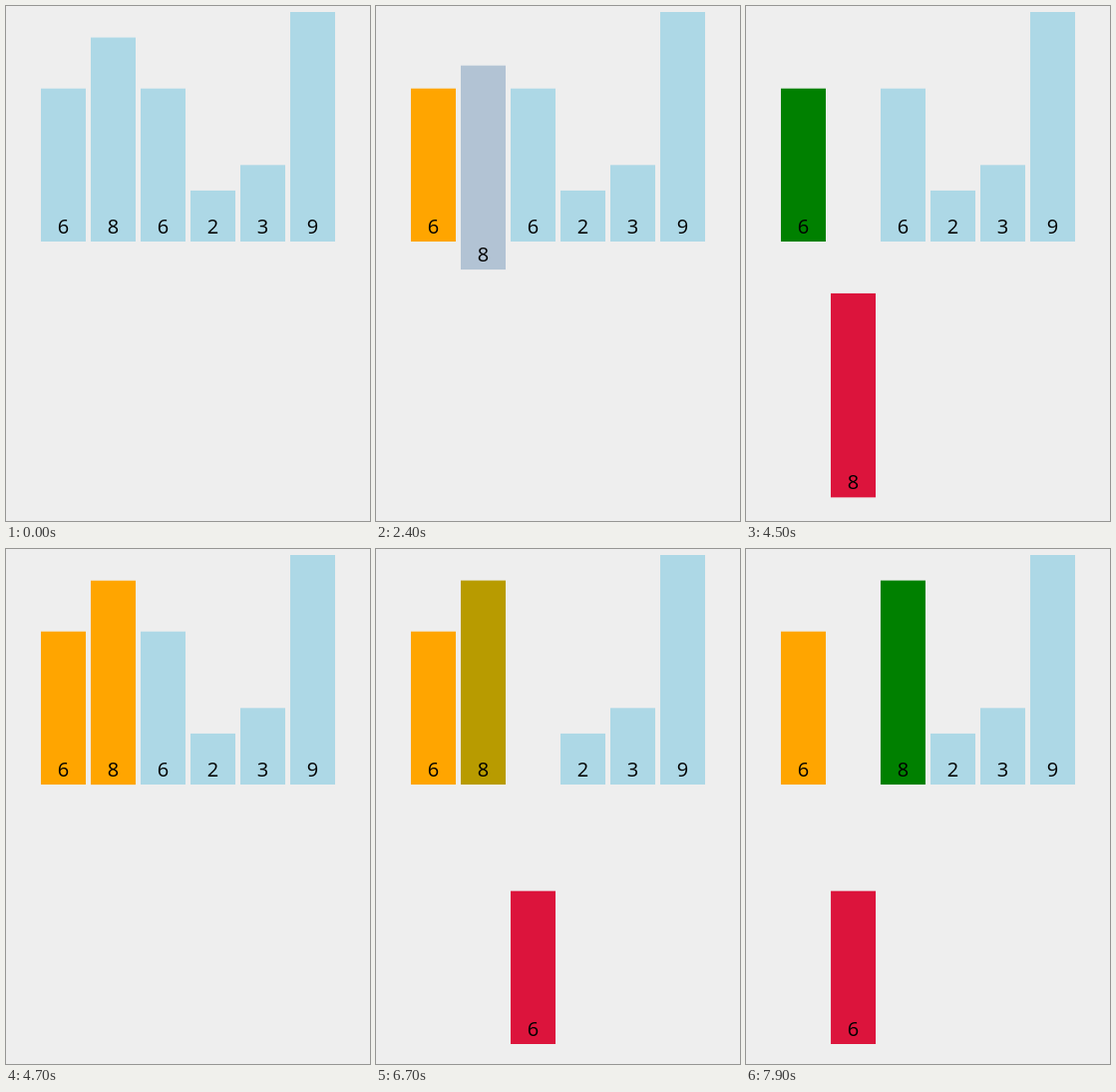
Recreate the animation shown at these times as an HTML page. Size 365 px wide and 516 px high, loop 8 s.

```html
<!DOCTYPE html>
<html lang="en">
<head>
<meta charset="utf-8">
<title>Insertion sort</title>
<style>
html, body { margin: 0; width: 100%; height: 100%; overflow: hidden; background: #eee; }
svg { display: block; width: 365px; height: 516px; }
text { font: 20px "Open Sans", "Noto Sans", sans-serif; text-anchor: middle; }
</style>
</head>
<body>
<svg id="stage" viewBox="0 0 365 516"></svg>
<script>
const LOOP = 8000, TICK = 100, DURATION = 250;
const BASE = 236, UNIT = 230 / 9, WIDTH = 45, PITCH = 50, LEFT = 35, DROP = 260;
const BLUE = [173, 216, 230], ORANGE = [255, 165, 0], GREEN = [0, 128, 0], CRIMSON = [220, 20, 60];
const values = [6, 8, 6, 2, 3, 9];

// Each step: start time, bar index, and the properties it eases to
const steps = [
  [1257, 0, { color: ORANGE }],
  [2325, 1, { color: CRIMSON, y: DROP }],
  [3397, 0, { color: GREEN }],
  [4462, 0, { color: ORANGE }],
  [4462, 1, { color: ORANGE, y: 0 }],
  [5530, 2, { color: CRIMSON, y: DROP }],
  [6597, 1, { color: GREEN }],
  [7666, 1, { slot: 2 }],
  [7666, 2, { slot: 1 }]
];

const stage = document.getElementById("stage");

function add(parent, tag, attrs) {
  const el = document.createElementNS("http://www.w3.org/2000/svg", tag);
  for (const key in attrs) el.setAttribute(key, attrs[key]);
  return parent.appendChild(el);
}

const bars = values.map(value => {
  const group = add(stage, "g", {});
  const height = value * UNIT;
  const rect = add(group, "rect", { y: BASE - height, width: WIDTH, height });
  add(group, "text", { x: WIDTH / 2, y: 228 }).textContent = value;
  return { group, rect };
});

const clamp = t => Math.min(1, Math.max(0, t));
const ease = t => t < 0.5 ? 4 * t ** 3 : 1 - 4 * (1 - t) ** 3;
const mix = (a, b, p) => a + (b - a) * p;
// Barely visible tints count as settled
const settle = p => p < 0.025 ? 0 : p > 0.97 ? 1 : p;

function draw(time) {
  const state = values.map((_, slot) => ({ slot, y: 0, color: BLUE }));
  for (const [start, index, to] of steps) {
    const p = ease(clamp((time - start) / DURATION));
    const bar = state[index];
    if (to.color) bar.color = bar.color.map((c, i) => mix(c, to.color[i], settle(p)));
    if ("y" in to) bar.y = mix(bar.y, to.y, p);
    if ("slot" in to) bar.slot = mix(bar.slot, to.slot, p);
  }
  state.forEach(({ slot, y, color }, i) => {
    bars[i].group.setAttribute("transform", `translate(${LEFT + slot * PITCH} ${y})`);
    bars[i].rect.setAttribute("fill", `rgb(${color.map(Math.round)})`);
  });
}

function frame() {
  const time = performance.now() % LOOP;
  draw(Math.floor(time / TICK) * TICK);
  requestAnimationFrame(frame);
}
frame();
</script>
</body>
</html>
```
